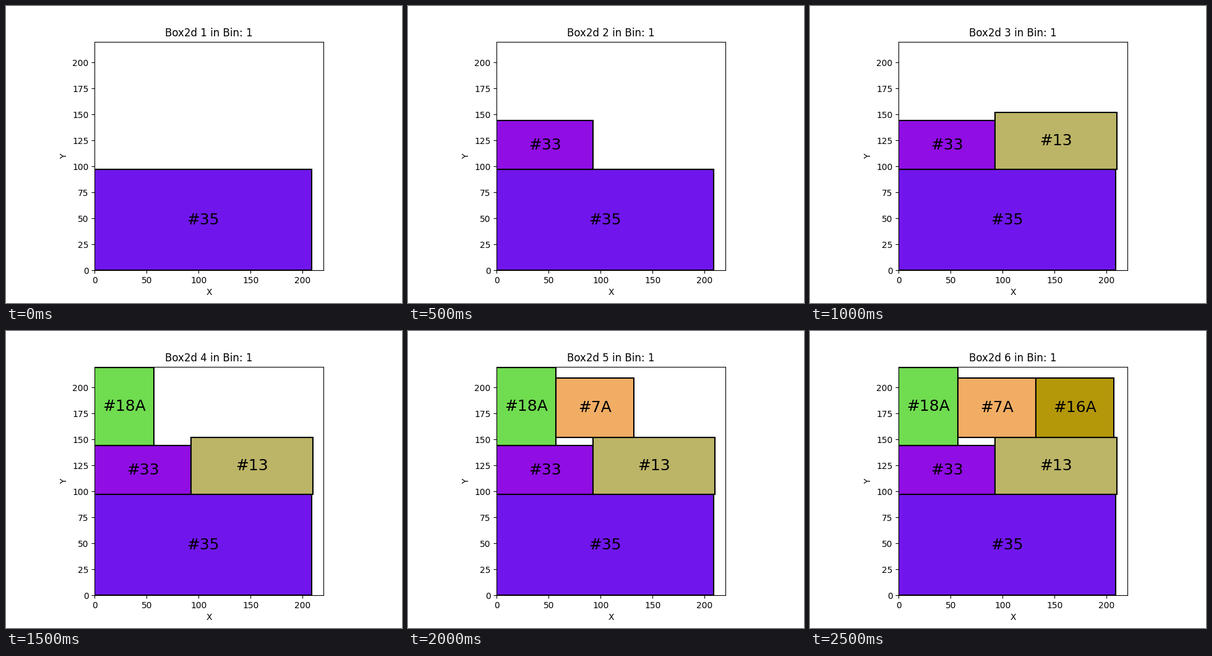
These frames come from a looping animation (640x480 px, 3 s). A matplotlib script:

```python
import matplotlib.pyplot as plt
from matplotlib.animation import FuncAnimation
from matplotlib.patches import Rectangle

BIN_SIZE = 220
# label, x, y, width, height, colour
BOXES = [
    ("#35", 0, 0, 209, 97, "#7016ec"),
    ("#33", 0, 97, 93, 47, "#900de4"),
    ("#13", 93, 97, 117, 55, "#bcb466"),
    ("#18A", 0, 144, 57, 75, "#70dc50"),
    ("#7A", 57, 152, 75, 57, "#f2ad64"),
    ("#16A", 132, 152, 75, 57, "#b4980a"),
]

plt.rcParams["font.family"] = "DejaVu Sans"
fig, ax = plt.subplots(figsize=(6.4, 4.8), dpi=100)


def draw(step):
    """Show the bin with the first step + 1 boxes packed."""
    ax.clear()
    ax.set(xlim=(0, BIN_SIZE), ylim=(0, BIN_SIZE), aspect="equal",
           xticks=range(0, 201, 50), yticks=range(0, 201, 25),
           xlabel="X", ylabel="Y", title=f"Box2d {step + 1} in Bin: 1")
    for label, x, y, w, h, color in BOXES[:step + 1]:
        ax.add_patch(Rectangle((x, y), w, h, facecolor=color,
                               edgecolor="black", linewidth=1.5))
        ax.text(x + w / 2, y + h / 2, label, fontsize=18,
                ha="center", va="center")


anim = FuncAnimation(fig, draw, frames=len(BOXES), init_func=lambda: draw(0),
                     interval=500, repeat=True, repeat_delay=0)
plt.show()
```
